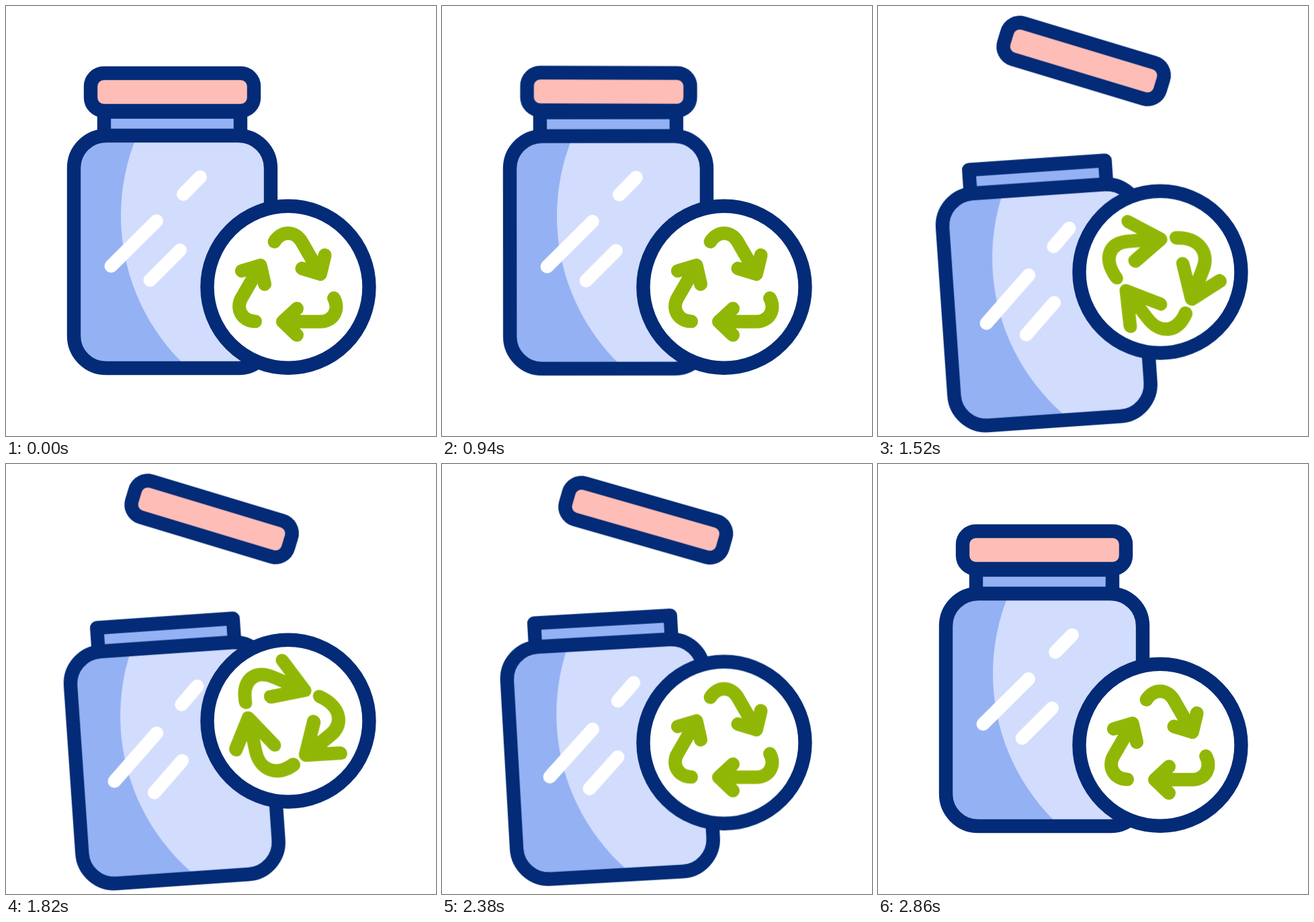
Write an HTML page without scripts that moves like this. It is 640x640 px and loops after 3600 ms.

```html
<!DOCTYPE html>
<html lang="en">
<head>
<meta charset="utf-8">
<title>Recyclable jar</title>
<style>
html, body { margin: 0; width: 100%; height: 100%; overflow: hidden; background: #fff; }
svg { display: block; width: 100vw; height: 100vh; }

.line { stroke: #032b77; stroke-width: 20.4; stroke-linejoin: round; }
.shine { stroke: #fff; stroke-width: 20; stroke-linecap: round; }
.arrow {
  fill: none; stroke: #91b706; stroke-width: 20;
  stroke-linecap: round; stroke-linejoin: round;
}

svg * {
  animation-duration: 3.6s;
  animation-iteration-count: infinite;
  animation-timing-function: cubic-bezier(.333, 0, .667, 1);
}
.lid, .tilt { transform-origin: 320px 320px; }
.jar    { animation-name: squash; transform-origin: 247.5px 549px; }
.lid    { animation-name: lid; }
.sink   { animation-name: sink; }
.tilt   { animation-name: tilt; }
.badge  { animation-name: hop; }
.lean   { animation-name: lean; transform-origin: 419px 424px; }
.spin   { animation-name: spin; transform-origin: 419px 421.4px; }
.arrow  { animation-name: stretch; }

@keyframes squash {
  0% { transform: scale(1, 1); }
  6.94% { transform: scale(1.195, .85); }
  15.28% { transform: scale(.92, 1.117); }
  25%, 100% { transform: scale(1, 1); }
}
@keyframes lid {
  0%, 25.42% { transform: translateY(0) rotate(0deg); }
  37.83%, 64.17% { transform: translateY(-33.4px) rotate(16.8deg); }
  79.03%, 100% { transform: translateY(0) rotate(0deg); }
}
@keyframes sink {
  0%, 25.42% { transform: translateY(0); }
  37.83%, 63.89% { transform: translateY(74px); }
  78.6%, 100% { transform: translateY(0); }
}
@keyframes tilt {
  0%, 25.42% { transform: rotate(0deg); }
  37.83%, 62.2% { transform: rotate(-3.95deg); }
  76.9%, 100% { transform: rotate(0deg); }
}
@keyframes hop {
  0%, 33.33% { transform: translateY(0); }
  48.9% { transform: translateY(-36.6px); }
  70.28%, 100% { transform: translateY(0); }
}
@keyframes lean {
  0%, 33.33%, 60%, 100% { transform: skew(0deg, 0deg); }
  42.2%, 51% { transform: skew(2.7deg, 2.7deg); }
}
@keyframes spin {
  0% { transform: rotate(0deg); }
  33.33% { transform: rotate(0deg); animation-timing-function: cubic-bezier(.3, 0, .266, 1); }
  60.56%, 100% { transform: rotate(360deg); }
}
@keyframes stretch {
  0%, 33.33%, 60%, 100% {
    d: path("M68.5 16.5C78 34 67 51.5 48.5 51.5L-7.5 51.5M13.5 32L-7.5 51.5L13.5 71.5");
  }
  42.2%, 51% {
    d: path("M64.5 3C80 33 66 55.5 38 55L-11.4 54.8M32.5 25.3L-11.4 54.8L32.5 84");
  }
}
</style>
</head>
<body>
<svg viewBox="0 0 640 640">
  <defs>
    <clipPath id="glass"><rect x="101" y="193" width="293" height="346" rx="48"/></clipPath>
  </defs>

  <g class="jar">
    <g class="sink">
      <g class="tilt">
        <path class="line" fill="#94b1f3" d="M146 193V157.5H349V193Z"/>
        <g clip-path="url(#glass)">
          <rect x="101" y="193" width="293" height="346" fill="#94b1f3"/>
          <circle cx="479" cy="312" r="308" fill="#d2dcfd"/>
        </g>
        <path class="shine" d="M264 280L289 254.500M156.500 387L224 320M214.500 408L259 363.500"/>
        <rect class="line" x="101" y="193" width="293" height="346" rx="48" fill="none"/>
      </g>
    </g>
    <rect class="lid line" x="126" y="100" width="243" height="56" rx="19.500" fill="#ffbdb7"/>
  </g>

  <g class="badge">
    <circle class="line" cx="420" cy="418.300" r="120.500" fill="#fff"/>
    <g class="lean">
      <g class="spin">
        <g transform="translate(419.500 418.300)">
          <path class="arrow" d="M68.5 16.5C78 34 67 51.5 48.5 51.5L-7.5 51.5M13.5 32L-7.5 51.5L13.5 71.5"/>
          <g transform="rotate(120)">
            <path class="arrow" d="M68.5 16.5C78 34 67 51.5 48.5 51.5L-7.5 51.5M13.5 32L-7.5 51.5L13.5 71.5"/>
          </g>
          <g transform="rotate(240)">
            <path class="arrow" d="M68.5 16.5C78 34 67 51.5 48.5 51.5L-7.5 51.5M13.5 32L-7.5 51.5L13.5 71.5"/>
          </g>
        </g>
      </g>
    </g>
  </g>
</svg>
</body>
</html>
```
